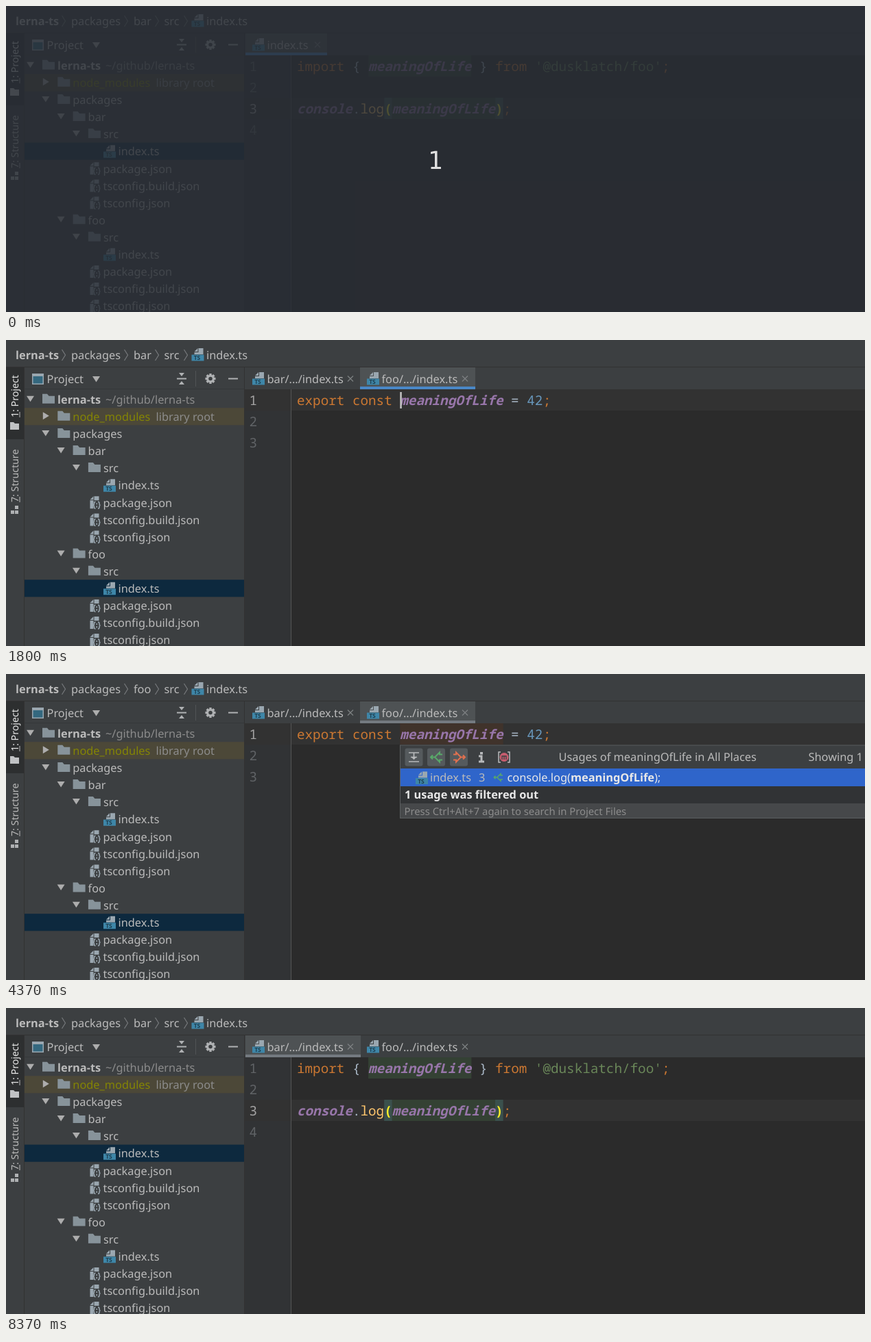
Write an HTML page that moves like this. It is 1252 px wide and 447 px high and loops after 8.53 s.

```html
<!DOCTYPE html>
<html lang="en">
<head>
<meta charset="utf-8">
<title>Find usages</title>
<style>
  html, body { margin: 0; width: 100%; height: 100%; overflow: hidden; background: #2b2b2b; }
  svg { display: block; width: 1252px; height: 447px; }
  text { font: 16.35px "Noto Sans", sans-serif; fill: #bbb; white-space: pre; text-rendering: geometricPrecision; }
  .bold { font-weight: 700; }
  .dim { fill: #8c8c8c; }
  .olive { fill: #848504; }
  .side { font-size: 14.2px; }
  .hint { font-size: 14.8px; fill: #8c8c8c; }
  .white { fill: #e8e8e8; }
  .code, .num { font: 500 19.27px "Noto Sans Mono", "DejaVu Sans Mono", monospace; fill: #a9b7c6; }
  .num { font-weight: 400; fill: #606366; }
  .num.now { fill: #a4a3a3; }
  .key { fill: #cc7832; }
  .name { fill: #9876aa; font-weight: 700; font-style: italic; }
  .fn { fill: #ffc66d; }
  .str { fill: #6a8759; }
  .lit { fill: #6897bb; }
  .paren { fill: #ffef28; font-weight: 700; }
  .badge { font: 700 8.5px "Open Sans", sans-serif; fill: #1f3f50; }
  .count { font: 36px "DejaVu Sans Mono", monospace; fill: #e0e0e0; }
</style>
</head>
<body>
<svg id="stage" viewBox="0 0 1252 447">
  <defs>
    <g id="folder"><path d="M0 0h7l2.5 3H18v11H0z" fill="#87939a"/></g>
    <g id="ts">
      <path d="M10 0h7v9H4V6h6z" fill="#9aa7b0"/><path d="M9 0v5H4z" fill="#9aa7b0"/>
      <rect y="9.5" width="18" height="9" fill="#3e86a8"/>
      <text class="badge" x="3.2" y="17.2">TS</text>
    </g>
    <g id="json">
      <path d="M6 0v5H1z" fill="#9aa7b0"/><path d="M7 0h7v6H6v12H1V6h6z" fill="#9aa7b0"/>
      <path d="M9 8q-2 0-2 2.500t-1.500 2.500q1.500 0 1.500 2.500t2 2.500M12.500 8q2 0 2 2.500t1.500 2.500q-1.500 0-1.500 2.500t-2 2.500M10.800 10v2M10.800 14v2.500"
        fill="none" stroke="#9aa7b0" stroke-width="1.500"/>
    </g>
    <path id="open" d="M-5.500-4h11L0 4.500z" fill="#adadad"/>
    <path id="shut" d="M-4-5.500v11L5 0z" fill="#adadad"/>
    <path id="close" d="M-4-4l8 8m0-8l-8 8" stroke="#7d8082" stroke-width="1.300"/>
    <path id="chevron" d="M-2.500-8L2.500 0l-5 8" fill="none" stroke="#777a7c" stroke-width="1.200"/>
    <path id="usage" d="M8-4H4V-7L-3 0l7 7V4h4M-9 0h6m-3-3l-3 3 3 3" fill="none" stroke-width="2"/>
  </defs>
</svg>
<script>
const LOOP = 8530;
const stage = document.getElementById('stage');

const rect = (x, y, w, h, fill) => `<rect x="${x}" y="${y}" width="${w}" height="${h}" fill="${fill}"/>`;
const text = (x, y, body, cls = '') => `<text x="${x}" y="${y}" class="${cls}">${body}</text>`;
const use = (id, x, y, extra = '') => `<use href="#${id}" x="${x}" y="${y}" ${extra}/>`;
const path = (d, color, width = 1.5) => `<path d="${d}" fill="none" stroke="${color}" stroke-width="${width}"/>`;
const span = (cls, body) => `<tspan class="${cls}">${body}</tspan>`;
// Visible only within the given "from-to" spans, in ms.
const during = (spans, body) => `<g data-on="${spans}">${body}</g>`;

const CHAR = 11.562;
const codeX = col => 424 + col * CHAR;
const rowY = line => 72 + (line - 1) * 31;
const mark = (line, col, len, fill) => rect(codeX(col), rowY(line), len * CHAR, 31, fill);
const codeLine = (line, body) => text(424, rowY(line) + 23, body, 'code');
const caret = (line, col) => rect(codeX(col), rowY(line) + 4, 2.5, 24, '#c4c4c4');
const currentRow = line => rect(348, rowY(line), 904, 31, '#323232') + rect(415, rowY(line), 1, 31, '#555');
const numbers = (count, current) => Array.from({length: count}, (_, i) =>
  text(354.5, rowY(i + 1) + 23, i + 1, i + 1 === current ? 'num now' : 'num')).join('');

function topBar() {
  const crumb = name => text(186, 28, name);
  return rect(0, 0, 1252, 447, '#3c3f41') + rect(0, 39, 1252, 1, '#323232') +
    text(14, 28, 'lerna-ts', 'bold') + text(95, 28, 'packages') +
    during('0-1970 6470-8530', crumb('bar')) + during('1970-6470', crumb('foo')) +
    text(230.5, 28, 'src') + use('ts', 270.5, 12) + text(292, 28, 'index.ts') +
    [84, 175, 220, 262].map(x => use('chevron', x, 22)).join('');
}

function sideBar() {
  const label = (y, key, name, cls) =>
    `<g transform="translate(18 ${y}) rotate(-90)">${text(0, 0, key + ': ' + name, 'side ' + cls)}${rect(0, 1.5, 8, 1, '#bbb')}</g>`;
  return rect(0, 40, 26, 105, '#2d2f30') + rect(26, 40, 1, 407, '#323232') +
    label(113, 1, 'Project', 'white') + label(237, 7, 'Structure', '') +
    '<path d="M6 120h5l2 2h6v9H6z" fill="#c0c2c4"/>' +
    rect(13, 242, 5, 5, '#afb1b3') + rect(7, 249, 5, 5, '#afb1b3') + rect(13, 249, 5, 5, '#afb1b3');
}

function projectHeader() {
  const teeth = Array.from({length: 8}, (_, i) =>
    `<rect x="-1.700" y="-7.500" width="3.400" height="4" transform="rotate(${i * 45})" fill="#afb1b3"/>`).join('');
  return rect(38, 49, 17, 16, '#9aa7b0') + rect(39.5, 53, 14, 10.5, '#34687f') +
    text(59.5, 63, 'Project') + use('open', 131.5, 57) +
    path('M249 56.500h14', '#afb1b3', 2) +
    '<path d="M252 48h8l-4 5zM252 65h8l-4-5z" fill="#afb1b3"/>' +
    rect(276, 45, 1, 23, '#515456') +
    `<g transform="translate(298 56.500)">${teeth}<circle r="4.300" fill="none" stroke="#afb1b3" stroke-width="3"/></g>` +
    rect(324, 55.5, 14, 2, '#afb1b3') + rect(27, 71, 321, 1, '#35383a');
}

function tree() {
  const rows = [
    [0, 'dir', 'lerna-ts'], [1, 'lib', 'node_modules'], [1, 'dir', 'packages'],
    ...['bar', 'foo'].flatMap(name => [
      [2, 'dir', name], [3, 'dir', 'src'], [4, 'ts', 'index.ts'],
      [3, 'json', 'package.json'], [3, 'json', 'tsconfig.build.json'], [3, 'json', 'tsconfig.json']])
  ];
  const center = i => 86.7 + i * 25.1;
  const select = i => rect(27, center(i) - 12.6, 320, 25.1, '#0d293e');
  const row = ([depth, kind, name], i) => {
    const y = center(i), x = 53 + depth * 22.3, base = y + 6.2;
    if (kind === 'ts') return use('ts', 142, y - 9) + text(163.5, base, name);
    if (kind === 'json') return use('json', 121.5, y - 9) + text(141.5, base, name);
    const lib = kind === 'lib';
    return use(lib ? 'shut' : 'open', x - 17.5, y - 1) + use('folder', x, y - 8) +
      text(x + 22, base, name, lib ? 'olive' : depth ? '' : 'bold');
  };
  return rect(27, center(1) - 12.6, 320, 25.1, '#4c4838') +
    during('0-1750 6170-8530', select(5)) + during('1750-6170', select(11)) +
    rows.map(row).join('') +
    text(145, 92.9, '~/github/lerna-ts', 'dim') + text(218.5, 118, 'library root', 'dim') +
    rect(347, 40, 1, 407, '#323232');
}

function tabs() {
  const active = (x, w) => rect(x, 40, w, 32, '#4e5254');
  const line = (x, w, color) => rect(x, 68, w, 4, color);
  const tab = (x, name, end) => use('ts', x, 47) + text(x + 21.5, 63, name) + use('close', end, 56.5);
  const blue = '#4a88c7', grey = '#747a80';
  return during('0-1600', active(349, 119) + line(349, 119, blue) + tab(359, 'index.ts', 454)) +
    during('1600-6070', active(516, 168)) + during('6070-8530', active(349, 168)) +
    during('1600-4230', line(516, 168, blue)) + during('4230-6070', line(516, 168, grey)) +
    during('6070-8370', line(349, 168, blue)) + during('8370-8530', line(349, 168, grey)) +
    during('1600-8530', tab(359, 'bar/.../index.ts', 502) + tab(526, 'foo/.../index.ts', 669));
}

function editor() {
  const life = span('name', 'meaningOfLife'), semi = span('key', ';');
  const green = '#344134', teal = '#3b514d';
  const bar = currentRow(3) + numbers(4, 3) +
    mark(1, 9, 13, green) + mark(3, 12, 13, green) + mark(3, 11, 1, teal) + mark(3, 25, 1, teal) +
    codeLine(1, `${span('key', 'import')} { ${life} } ${span('key', 'from')} ${span('str', "'@dusklatch/foo'")}${semi}`) +
    codeLine(3, `${span('name', 'console')}.${span('fn', 'log')}${span('paren', '(')}${life}${span('paren', ')')}${semi}`);
  const foo = currentRow(1) + numbers(3, 1) +
    during('2000-6070', mark(1, 13, 13, '#40332b')) +
    codeLine(1, `${span('key', 'export const')} ${life} = ${span('lit', '42')}${semi}`);
  const bulb = '<path d="M435.500 116q-3-3-3-6a6.500 6 0 0 1 13 0q0 3-3 6z" fill="#f2a932"/>' +
    '<path d="M436 107q2-2 4-1l-3 4z" fill="#ffd98a"/>' +
    rect(436, 117, 6, 1.7, '#b4b6b8') + rect(436.5, 119.7, 5, 1.7, '#b4b6b8');
  return rect(348, 72, 904, 375, '#2b2b2b') + rect(348, 72, 67, 375, '#313335') + rect(415, 72, 1, 375, '#555') +
    during('0-1600 6070-8530', bar) + during('1600-6070', foo) + during('2530-4230', bulb) +
    during('170-670 1170-1600 6070-6630 7100-7600 8270-8370', caret(3, 12)) +
    during('1600-2830 3330-3830', caret(1, 13));
}

function popup() {
  const button = x => `<rect x="${x}" y="108.500" width="26" height="26" rx="3" fill="#555a5d"/>`;
  const green = '#59a869', red = '#e0704f', grey = '#b8babc';
  return rect(574, 103.5, 690, 107.5, '#5b5e60') + rect(575, 104.5, 690, 33.5, '#3c3f41') +
    [581.5, 614, 647].map(button).join('') +
    path('M587 115h15M587 128h15M590 121.500h9M594.500 115v9m-3-3l3 3 3-3', grey, 1.7) +
    use('usage', 628, 121.5, `stroke="${green}"`) +
    use('usage', -660, -121.5, `stroke="${red}" transform="rotate(180)"`) +
    rect(691, 114, 4, 3.5, grey) + path('M689 120h4v8m-4 0h8', grey, 3) +
    path('M721 114h-3v15h3M731 114h3v15h-3', grey, 1.5) +
    '<circle cx="726" cy="121.500" r="6.500" fill="#c75d6f"/>' +
    path('M723 125v-5h6v5m-3-5v5', '#3c3f41', 1.3) +
    text(805.5, 127, 'Usages of meaningOfLife in All Places') + text(1169.5, 127, 'Showing 1') +
    rect(575, 138, 690, 26, '#2f65ca') + use('ts', 597, 142.5) +
    text(618, 157, 'index.ts') + text(689, 157, '3') +
    `<g transform="translate(718 151) scale(.75)">${use('usage', 0, 0, `stroke="${green}"`)}</g>` +
    text(730.5, 157, `console.log(${span('bold white', 'meaningOfLife')});`, 'white') +
    rect(575, 164, 690, 25, '#313335') + text(581, 182, '1 usage was filtered out', 'bold white') +
    rect(575, 189, 690, 21, '#46484a') +
    text(580.5, 206, 'Press Ctrl+Alt+7 again to search in Project Files', 'hint');
}

const intro = rect(0, 0, 1252, 447, 'rgba(40,44,52,.82)') + text(614.7, 238, '1', 'count');

stage.insertAdjacentHTML('beforeend',
  topBar() + sideBar() + projectHeader() + tree() + tabs() + editor() +
  `<g id="popup">${popup()}</g>` + during('0-170', intro));

const timed = [...stage.querySelectorAll('[data-on]')].map(node => ({
  node, spans: node.dataset.on.split(' ').map(s => s.split('-').map(Number))
}));
const popupNode = document.getElementById('popup');
// [start ms, vertical scale]
const unfold = [[0, 0], [4270, .45], [4330, .85], [4370, 1], [6070, .44], [6130, 0]];

function draw(now) {
  const t = now % LOOP;
  for (const {node, spans} of timed)
    node.style.display = spans.some(([from, to]) => t >= from && t < to) ? '' : 'none';
  const scale = unfold.findLast(([start]) => t >= start)[1];
  popupNode.style.display = scale ? '' : 'none';
  popupNode.setAttribute('transform', `translate(0 ${157.5 * (1 - scale)}) scale(1 ${scale})`);
}

const begin = performance.now();
function tick() {
  draw(performance.now() - begin);
  requestAnimationFrame(tick);
}
tick();
</script>
</body>
</html>
```
